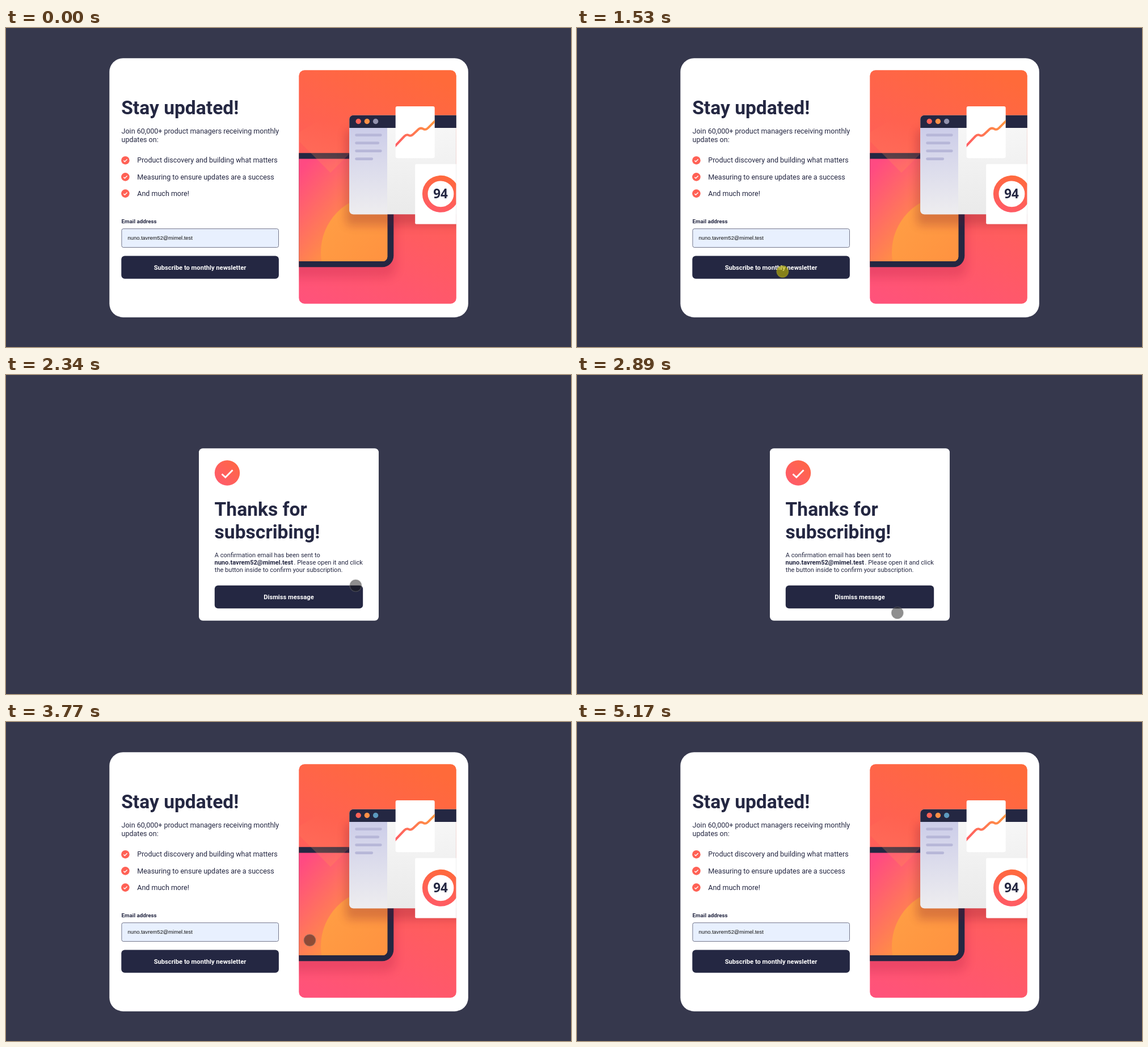
An HTML page for the animation above (5.69 s loop, 996 by 562 pixels).

```html
<!DOCTYPE html>
<html lang="en">
<head>
<meta charset="utf-8">
<title>Newsletter sign-up</title>
<style>
  html, body { margin: 0; width: 100%; height: 100%; overflow: hidden; background: #36384d; }
  svg { display: block; width: 996px; height: 562px; }
  text { font-family: Roboto, sans-serif; fill: #242742; white-space: pre; }
  .title { font-size: 33.6px; font-weight: 700; }
  .body { font-size: 12.5px; }
  .note { font-size: 11.06px; }
  .label { font-size: 9.8px; font-weight: 700; }
  .btn { font-size: 11.2px; font-weight: 700; fill: #fff; text-anchor: middle; }
  .field { font-family: "Liberation Sans", Arial, sans-serif; font-size: 9.33px; fill: #111; }
  .score { font-family: "Open Sans", "Noto Sans", sans-serif; font-size: 22.4px; font-weight: 700; text-anchor: middle; }
  .bold { font-weight: 700; }
  .navy { fill: #242742; }
  .tick { fill: none; stroke: #fff; }
</style>
</head>
<body>
<svg viewBox="0 0 996 562">
  <defs>
    <linearGradient id="wall" gradientUnits="userSpaceOnUse" x1="540" y1="490" x2="740" y2="80">
      <stop offset="0" stop-color="#ff527b"/><stop offset="1" stop-color="#ff6a3a"/>
    </linearGradient>
    <linearGradient id="screen" gradientUnits="userSpaceOnUse" x1="518" y1="250" x2="632" y2="345">
      <stop offset="0" stop-color="#ff4a82"/><stop offset="1" stop-color="#ff963f"/>
    </linearGradient>
    <linearGradient id="sun" gradientUnits="userSpaceOnUse" x1="560" y1="310" x2="660" y2="411">
      <stop offset="0" stop-color="#ff9f45"/><stop offset="1" stop-color="#ff9340"/>
    </linearGradient>
    <linearGradient id="veil" gradientUnits="userSpaceOnUse" x1="565" y1="255" x2="585" y2="170">
      <stop offset="0" stop-color="#ff8a55" stop-opacity=".36"/><stop offset="1" stop-color="#ff8a55" stop-opacity="0"/>
    </linearGradient>
    <linearGradient id="pane" x1="0" y1="0" x2="0" y2="1">
      <stop offset="0" stop-color="#f8f8f8"/><stop offset="1" stop-color="#eaeaea"/>
    </linearGradient>
    <linearGradient id="side" x1="0" y1="0" x2="0" y2="1">
      <stop offset="0" stop-color="#cccde9"/><stop offset="1" stop-color="#eeedef"/>
    </linearGradient>
    <linearGradient id="trend" gradientUnits="userSpaceOnUse" x1="687" y1="200" x2="756" y2="170">
      <stop offset="0" stop-color="#ff5f62"/><stop offset="1" stop-color="#ff9440"/>
    </linearGradient>
    <linearGradient id="ring" gradientUnits="userSpaceOnUse" x1="758" y1="325" x2="775" y2="260">
      <stop offset="0" stop-color="#ff5a66"/><stop offset="1" stop-color="#ff6a3c"/>
    </linearGradient>
    <linearGradient id="badge" x1="0" y1="1" x2="1" y2="0">
      <stop offset="0" stop-color="#ff5a70"/><stop offset="1" stop-color="#ff6740"/>
    </linearGradient>
    <clipPath id="art"><rect x="516.3" y="74.3" width="277.5" height="411.5" rx="10"/></clipPath>
    <clipPath id="sheet"><rect x="686.7" y="138" width="69" height="91.3" rx="3"/></clipPath>
    <clipPath id="glass"><path id="glassShape" d="M500 230.5H672.3V403a8 8 0 0 1-8 8H500Z"/></clipPath>
    <filter id="soft" x="-30%" y="-30%" width="160%" height="160%"><feGaussianBlur stdDeviation="8"/></filter>
  </defs>

  <rect width="996" height="562" fill="#36384d"/>

  <g id="form">
    <rect x="182.3" y="53.2" width="632.5" height="456.5" rx="24" fill="#fff"/>
    <text class="title" x="203.2" y="152">Stay updated!</text>
    <text class="body" x="203.6" y="186">Join 60,000+ product managers receiving monthly</text>
    <text class="body" x="203.6" y="201">updates on:</text>
    <g id="list"></g>
    <text class="label" x="203.6" y="343.7">Email address</text>
    <rect x="203.9" y="353.7" width="276.6" height="32.8" rx="3" fill="#e8f0fe" stroke="#74778c"/>
    <text class="field" x="214.6" y="373.4">nuno.tavrem52@mimel.test</text>
    <rect class="navy" x="203.3" y="401.4" width="277.6" height="40.4" rx="6"/>
    <text class="btn" x="342" y="425.8">Subscribe to monthly newsletter</text>

    <g clip-path="url(#art)">
      <rect x="516" y="74" width="279" height="412" fill="url(#wall)"/>
      <path d="M490 250H688V420a20 20 0 0 1-20 20H490Z" fill="#a01040" opacity=".2" filter="url(#soft)"/>
      <path class="navy" d="M500 220.3H683.3V401.300a20 20 0 0 1-20 20H500Z"/>
      <path d="M500 230.5H672.3V403a8 8 0 0 1-8 8H500Z" fill="url(#screen)"/>
      <g clip-path="url(#glass)">
        <circle cx="655" cy="395" r="100" fill="url(#sun)"/>
      </g>
      <path d="M516 199L572 255L622 205L569 152L516 184Z" fill="url(#veil)"/>
      <rect x="599" y="180" width="230" height="168" rx="8" fill="#70102c" opacity=".25" filter="url(#soft)"/>

      <rect x="605.3" y="153.700" width="220" height="174.500" rx="7" fill="url(#pane)"/>
      <path d="M605.3 176H672V328.200H612.300a7 7 0 0 1-7-7Z" fill="url(#side)"/>
      <path class="navy" d="M605.3 176V160.700a7 7 0 0 1 7-7H800V176Z"/>
      <circle cx="621.2" cy="164.500" r="4.700" fill="#ff6257"/>
      <circle cx="636.400" cy="164.500" r="4.700" fill="#ff9046"/>
      <circle id="dot" cx="651.600" cy="164.500" r="4.700"/>
      <g id="bars" fill="#b7b7d8"></g>

      <rect x="686.7" y="138" width="69" height="91.300" rx="3" fill="#fff"/>
      <path clip-path="url(#sheet)" d="M684 210L702 191Q706 187 710 189Q714 191 718 187L726 179.500Q730 175 735 177.500Q740 180.500 744 176L759 161"
        fill="none" stroke="url(#trend)" stroke-width="4"/>
      <rect x="721.2" y="239.800" width="90" height="105.700" rx="2" fill="#fff"/>
      <circle cx="766.400" cy="292.300" r="27.700" fill="none" stroke="url(#ring)" stroke-width="9.600"/>
      <text class="score" x="766" y="300.300">94</text>
      <path d="M793.600 240V345" stroke="#e6e6ea" stroke-width=".7"/>
    </g>
  </g>

  <g id="thanks">
    <rect x="340" y="129.300" width="317" height="303.400" rx="7" fill="#fff"/>
    <circle cx="390" cy="172.500" r="22.200" fill="url(#badge)"/>
    <path class="tick" d="M380.500 174.500L386.800 180.300L399.500 167.500" stroke-width="2.900"/>
    <text class="title" x="367.600" y="247.700">Thanks for</text>
    <text class="title" x="367.600" y="288">subscribing!</text>
    <text class="note" x="367.800" y="320.800">A confirmation email has been sent to</text>
    <text class="note bold" x="367.500" y="333.600">nuno.tavrem52@mimel.test</text>
    <text class="note" x="507.500" y="333.600">. Please open it and click</text>
    <text class="note" x="367.800" y="346.600">the button inside to confirm your subscription.</text>
    <rect class="navy" x="367.800" y="370.800" width="261.400" height="40.400" rx="6"/>
    <text class="btn" x="498.500" y="395.200">Dismiss message</text>
  </g>

  <circle id="pointer" r="10.300" stroke-width="1.500"/>
</svg>

<script>
const $ = id => document.getElementById(id);
const LOOP = 5690;

const items = [
  'Product discovery and building what matters',
  'Measuring to ensure updates are a success',
  'And much more!'
];
$('list').innerHTML = items.map((label, i) => {
  const y = 233.2 + i * 29.2;
  return `<circle cx="210.4" cy="${y}" r="7.3" fill="#ff6155"/>
    <path class="tick" d="M207.3 ${y + .4}l2.1 2l4.2 -4.3" stroke-width="1.4"/>
    <text class="body" x="231.3" y="${y + 4.2}">${label}</text>`;
}).join('');

$('bars').innerHTML = [47.5, 43, 47.5, 32].map((w, i) =>
  `<rect x="615.2" y="${186.3 + i * 14}" width="${w}" height="4.600" rx="2.300"/>`).join('');

// start, end, number of steps, points evenly spaced in time
const moves = [
  [360, 1130, 11, [[833, 527], [625, 494], [447, 460], [376, 440], [365, 431]]],
  [1460, 1530, 1, [[364, 430], [362.4, 429]]],
  [2000, 2540, 8, [[378, 424], [460, 398], [565, 376], [658, 372.5], [684, 400]]],
  [2610, 3300, 10, [[668, 424], [600, 436], [548, 406], [541, 389.5], [535.5, 384.5]]],
  [3970, 4530, 8, [[541, 377], [586, 354], [655, 347], [740, 360], [816, 400]]],
  [4600, 5090, 7, [[851, 440], [909, 503], [951, 538], [970, 554], [976.5, 559.5]]]
];

function spline(pts, u) {
  const last = pts.length - 1;
  const i = Math.min(Math.floor(u * last), last - 1);
  const f = u * last - i;
  const at = k => pts[Math.max(0, Math.min(last, k))];
  const [a, b, c, d] = [at(i - 1), at(i), at(i + 1), at(i + 2)];
  return [0, 1].map(k => b[k] + f / 2 * (c[k] - a[k]
    + f * (2 * a[k] - 5 * b[k] + 4 * c[k] - d[k]
    + f * (3 * (b[k] - c[k]) + d[k] - a[k]))));
}

function pointerAt(t) {
  const [start, end, steps, pts] = moves.filter(m => m[0] <= t).pop() || moves[0];
  const u = Math.max(0, Math.min(1, (t - start) / (end - start)));
  return spline(pts, Math.floor(u * steps + 1e-6) / steps);
}

const within = (t, from, to) => t >= from && t < to;
const show = (el, on) => el.setAttribute('display', on ? 'inline' : 'none');

function draw(now) {
  const t = now % LOOP;
  const sent = within(t, 1800, 3770);
  const pressed = within(t, 1460, 1800) || within(t, 3630, 3770);
  show($('form'), !sent);
  show($('thanks'), sent);
  $('dot').setAttribute('fill', t < 1800 ? '#9292ae' : '#5c9abf');

  const pointer = $('pointer');
  const [x, y] = pointerAt(t);
  show(pointer, within(t, 360, 5170));
  pointer.setAttribute('cx', x);
  pointer.setAttribute('cy', y);
  pointer.setAttribute('fill', pressed ? 'rgba(200,190,0,.6)' : 'rgba(20,20,20,.48)');
  pointer.setAttribute('stroke', pressed ? 'rgba(170,165,40,.5)' : 'rgba(115,115,115,.4)');
  requestAnimationFrame(draw);
}
draw(performance.now());
</script>
</body>
</html>
```
